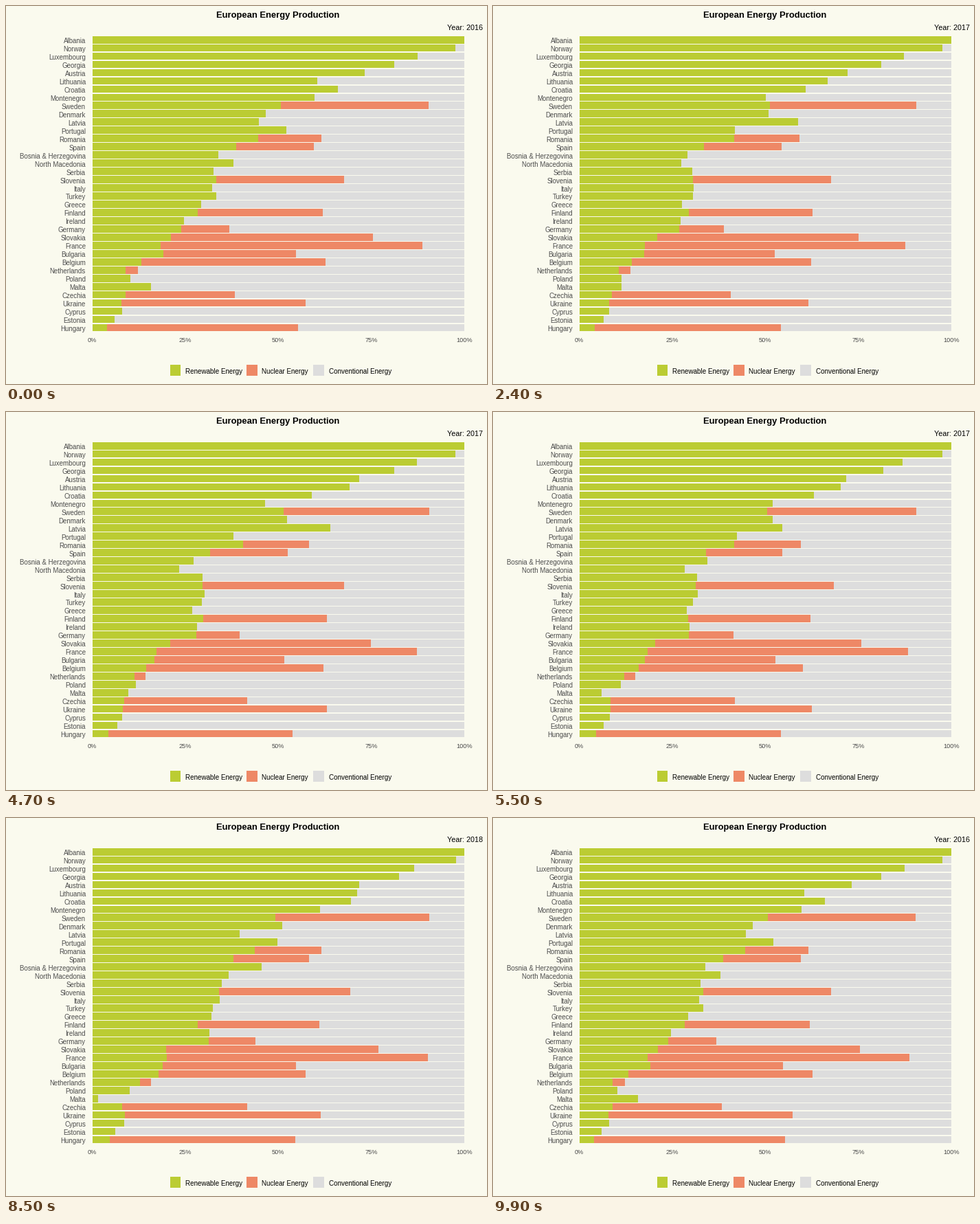
Animation, 700 px wide and 550 px high, one loop 10 s. Source, as a matplotlib script:

```python
import matplotlib.pyplot as plt
from matplotlib.animation import FuncAnimation
from matplotlib.patches import Rectangle

W, H, DPI = 700, 550, 100
FRAMES, INTERVAL = 100, 100
LEFT, RIGHT = 126, 667
TOP, PITCH = 43.74, 11.967
BAR = 0.9 * PITCH
KEY = 15.4
PAPER, GREEN, ORANGE, GREY = "#fafaee", "#bbcc33", "#ee8866", "#dddddd"
YEARS = (2016, 2017, 2018)
# (first frame, last frame) of the move away from each year
MOVES = ((11, 33), (45, 67), (79, 100))

# Right edge of the bars in pixels, one value per year
RENEWABLE = {
    "Albania": (667, 667, 667),
    "Norway": (654, 654, 655),
    "Luxembourg": (599, 598, 593),
    "Georgia": (565, 565, 573),
    "Austria": (522, 514, 513),
    "Lithuania": (453, 500, 517),
    "Croatia": (483, 445, 504),
    "Montenegro": (449, 377, 458),
    "Sweden": (400, 404, 391),
    "Denmark": (378, 409, 404),
    "Latvia": (368, 472, 337),
    "Portugal": (408, 331, 394),
    "Romania": (367, 345, 362),
    "Spain": (335, 297, 331),
    "Bosnia & Herzegovina": (309, 273, 378),
    "North Macedonia": (331, 252, 323),
    "Serbia": (302, 286, 315),
    "Slovenia": (306, 286, 310),
    "Italy": (300, 289, 312),
    "Turkey": (306, 285, 300),
    "Greece": (284, 271, 300),
    "Finland": (279, 287, 279),
    "Ireland": (259, 278, 300),
    "Germany": (255, 277, 299),
    "Slovakia": (240, 239, 232),
    "France": (225, 219, 235),
    "Bulgaria": (229, 216, 228),
    "Belgium": (197, 204, 225),
    "Netherlands": (174, 187, 197),
    "Poland": (181, 189, 180),
    "Malta": (211, 178, 126),
    "Czechia": (174, 172, 169),
    "Ukraine": (168, 170, 173),
    "Cyprus": (169, 169, 172),
    "Estonia": (158, 162, 159),
    "Hungary": (147, 149, 151),
}
NUCLEAR = {
    "Sweden": (615, 616, 616),
    "Romania": (459, 441, 459),
    "Spain": (448, 410, 440),
    "Slovenia": (492, 492, 502),
    "Finland": (461, 467, 455),
    "Germany": (325, 340, 367),
    "Slovakia": (534, 531, 543),
    "France": (606, 598, 615),
    "Bulgaria": (422, 405, 422),
    "Belgium": (465, 462, 433),
    "Netherlands": (192, 203, 213),
    "Czechia": (333, 351, 353),
    "Ukraine": (436, 467, 460),
    "Hungary": (425, 417, 421),
}

plt.rcParams["font.family"] = "Liberation Sans"
plt.rcParams["toolbar"] = "None"
fig = plt.figure(figsize=(W / DPI, H / DPI), dpi=DPI, facecolor=PAPER)
ax = fig.add_axes([0, 0, 1, 1])
ax.set_xlim(0, W)
ax.set_ylim(H, 0)
ax.axis("off")


def rect(x0, y0, x1, y1, color):
    """Flat rectangle with its edges on whole pixels."""
    x0, y0, x1, y1 = (round(v) for v in (x0, y0, x1, y1))
    return ax.add_patch(Rectangle((x0, y0), x1 - x0, y1 - y0, fc=color, lw=0))


def label(x, y, text, px, ha="left", color="black", **style):
    return ax.text(x, y, text, fontsize=px * 72 / DPI, ha=ha, va="baseline",
                   color=color, **style)


def ease(t):
    return 4 * t ** 3 if t < 0.5 else 1 - 4 * (1 - t) ** 3


def state(frame):
    """Index of the year left, index of the year reached, progress 0 to 1."""
    for i, (start, end) in enumerate(MOVES):
        if frame < end:
            t = max(0, (frame - start) / (end - start))
            return i, (i + 1) % len(YEARS), t
    return 0, 0, 0


label(395.5, 17, "European Energy Production", 13, "center", weight="bold")
year = label(694, 35, "", 10.7, "right")

green, orange = {}, {}
for i, name in enumerate(RENEWABLE):
    y0 = TOP + PITCH * i
    y1 = y0 + BAR
    rect(LEFT, y0, RIGHT, y1, GREY)
    if name in NUCLEAR:
        orange[name] = rect(LEFT, y0, LEFT, y1, ORANGE)
    green[name] = rect(LEFT, y0, LEFT, y1, GREEN)
    label(116, round(y0 + 10.37), name, 9.75, "right", "#4d4d4d")

for i in range(5):
    x = 125.5 + (RIGHT - 125.5) * i / 4
    label(x, 489, f"{25 * i}%", 9.2, "center", "#4d4d4d")

for x, tx, color, text in ((239, 261, GREEN, "Renewable Energy"),
                           (350.2, 372, ORANGE, "Nuclear Energy"),
                           (447.2, 470, GREY, "Conventional Energy")):
    rect(x, 522, x + KEY, 538, color)
    label(tx, 535, text, 9.9)


def draw(frame):
    a, b, t = state(frame)
    k = ease(t)
    year.set_text(f"Year: {YEARS[b if t >= 0.5 else a]}")
    for bars, edges in ((green, RENEWABLE), (orange, NUCLEAR)):
        for name, bar in bars.items():
            e = edges[name]
            bar.set_width(round(e[a] + (e[b] - e[a]) * k) - LEFT)
    return [year, *green.values(), *orange.values()]


anim = FuncAnimation(fig, draw, frames=FRAMES, interval=INTERVAL,
                     init_func=lambda: draw(0), repeat=True, repeat_delay=0)
plt.show()
```
